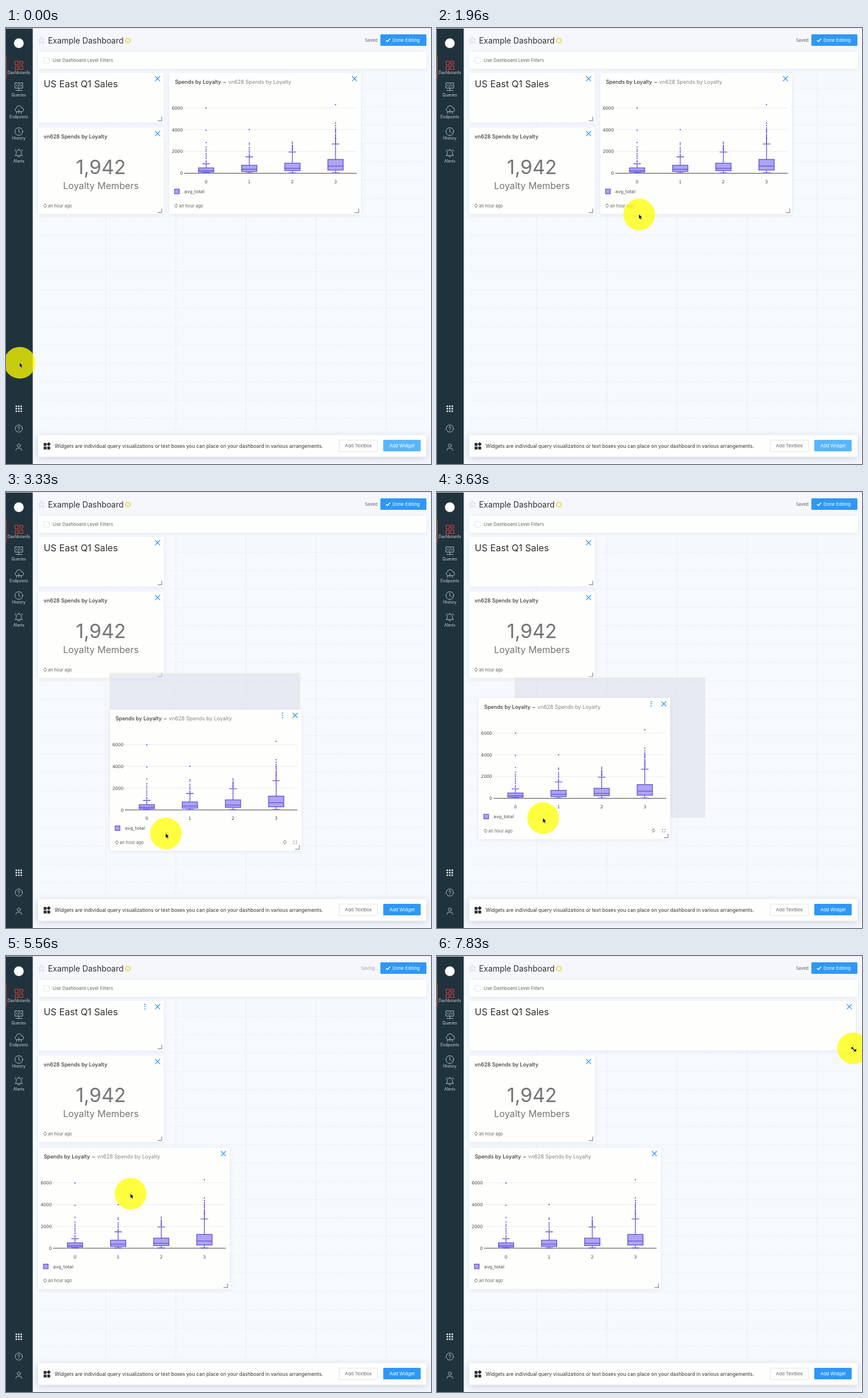
Animation, 739 px wide and 758 px high, one loop 8 s. Source, as an HTML page:

```html
<!DOCTYPE html>
<html lang="en">
<head>
<meta charset="utf-8">
<title>Example Dashboard</title>
<style>
  html, body { margin: 0; width: 100%; height: 100%; overflow: hidden; background: #f6f9fd; }
  svg { display: block; width: 739px; height: 758px; font-family: Inter, Roboto, sans-serif; }
  .card { fill: #fefefd; filter: drop-shadow(0 1px 3px rgba(90, 110, 150, .13)); }
  .bar { fill: #fefefd; filter: drop-shadow(0 3px 7px rgba(70, 100, 130, .25)); }
  .title { font-size: 9.15px; font-weight: 500; fill: #3a3a3a; }
  .title .muted { font-weight: 400; fill: #858585; }
  .ago { font-size: 7.4px; fill: #666; }
  .axis { font: 7.6px "DejaVu Sans", sans-serif; fill: #444; }
  .button { font-size: 7.9px; }
  .nav { font-size: 6.9px; fill: #ccd3d7; text-anchor: middle; }
  .line { fill: none; stroke: #c3cbd0; stroke-width: .9; stroke-linejoin: round; stroke-linecap: round; }
  .tool { fill: none; stroke: #777; stroke-width: .9; }
  .close { fill: none; stroke: #2e96f1; stroke-width: 1.3; }
  .grip { fill: none; stroke: #888; stroke-width: 1.2; }
  .box { fill: #aea4f3; stroke: #6254d9; stroke-width: 1.3; }
</style>
</head>
<body>
<svg viewBox="0 0 739 758">
  <rect width="739" height="758" fill="#f6f9fd"/>
  <rect width="739" height="40" fill="#f6f7fc"/>
  <rect width="739" height="1" fill="#dfe1e4"/>
  <g id="grid" fill="none"></g>

  <!-- header -->
  <path d="M61.5 15.7l1.7 3.9 4.2.4-3.2 2.8 1 4.1-3.7-2.2-3.7 2.2 1-4.1-3.2-2.8 4.2-.4z" fill="none" stroke="#cfd2d6" stroke-width=".9"/>
  <text x="73" y="26.7" font-size="13.9" fill="#303236">Example Dashboard</text>
  <g fill="none" stroke="#e3d943">
    <circle cx="212" cy="22" r="4.4" stroke-width="1.5" stroke-dasharray="2.5 .95"/>
    <circle cx="212" cy="22" r="3.2" stroke-width=".8"/>
  </g>
  <text id="status" y="24.4" font-size="7.5" fill="#666"></text>
  <rect x="651" y="11" width="80" height="20" rx="1.5" fill="#3097f4"/>
  <path d="M661 21.2l2.3 2.4 4.5-4.8" fill="none" stroke="#fff" stroke-width="1.6"/>
  <text x="672" y="24" class="button" fill="#fff">Done Editing</text>
  <rect x="56" y="42" width="675" height="29" class="card"/>
  <rect x="66" y="51.5" width="9.5" height="9.5" rx="1" fill="#fff" stroke="#e5e5e5"/>
  <text x="81" y="59.3" font-size="7.95" fill="#666">Use Dashboard Level Filters</text>

  <!-- widgets -->
  <g id="members" transform="translate(56 173.5)"></g>
  <g id="banner" transform="translate(56 78)"></g>
  <rect id="slot" width="333" height="245.5" fill="#dcdeea" opacity=".55" stroke="#f8f8e6" stroke-width="2"/>
  <g id="chart"></g>

  <!-- footer -->
  <rect x="56" y="707.5" width="675" height="38" class="bar"/>
  <path d="M65.5 721.5h5v5h-5zm0 6.3h5v5h-5zm6.3 0h5v5h-5zM74.3 720l3.5 3.5-3.5 3.5-3.5-3.5z" fill="#26282b"/>
  <text x="84.5" y="730" font-size="8.55" fill="#333">Widgets are individual query visualizations or text boxes you can place on your dashboard in various arrangements.</text>
  <rect x="579.5" y="716.5" width="66.5" height="20" rx="1.5" fill="#fff" stroke="#e1e3e6"/>
  <text x="612.7" y="729.4" class="button" text-anchor="middle" fill="#666">Add Textbox</text>
  <rect id="add" x="656" y="716" width="65" height="20" rx="1.5"/>
  <text x="688.7" y="729.4" class="button" text-anchor="middle" fill="#fff">Add Widget</text>

  <!-- sidebar -->
  <rect y="1" width="46.5" height="757" fill="#20333d"/>
  <rect y="48" width="1" height="41" fill="#c23a32"/>
  <circle cx="22.3" cy="26.5" r="8.5" fill="#fff"/>
  <path class="line" style="stroke:#e04435;stroke-width:1.1" d="M15.7 57.8h5.4v6.4h-5.4zM23.9 57.8h5.4v5h-5.4zM15.7 67.2h5.4v5h-5.4zM23.9 65.8h5.4v6.4h-5.4z"/>
  <path class="line" d="M16 95.5h13v9H16zM22.5 104.5v4M17 108.5h11M20 98l-2 2 2 2M25 98l2 2-2 2M23.3 97.5l-1.6 5"/>
  <path class="line" d="M18.5 145.5a3.5 3.5 0 0 1-.5-6.5 4.6 4.6 0 0 1 9-.5 3.5 3.5 0 0 1 0 7zM22.3 142v5M18.5 145.5v2M26.5 145.5v2"/>
  <path class="line" d="M18 148.5h.1M22.3 148.5h.1M26.7 148.5h.1" stroke-width="2"/>
  <circle class="line" cx="22.3" cy="180" r="6.7"/><path class="line" d="M22.3 175.5v4.8l3 1.8"/>
  <path class="line" d="M16 221.5c1.7-1.2 2-2.7 2-5a4.3 4.3 0 0 1 8.6 0c0 2.3.3 3.8 2 5zM20.5 223.5q1.8 1.7 3.6 0M22.3 210.5v1.5M16 214q.2-2 1.5-3M28.6 214q-.2-2-1.5-3"/>
  <g id="nav"></g>
  <circle class="line" cx="22.3" cy="696.3" r="6.2"/>
  <path class="line" d="M20.5 695a1.8 1.8 0 1 1 2.7 1.5q-.9.5-.9 1.4M22.3 699.5v.2"/>
  <circle class="line" cx="22.3" cy="726" r="2.7"/><path class="line" d="M17.2 734.5v-.8a3.4 3.4 0 0 1 3.4-3h3.4a3.4 3.4 0 0 1 3.4 3v.8"/>

  <!-- pointer -->
  <g id="pointer">
    <circle r="27.5" fill="#ff0" opacity=".75"/>
    <path id="arrow" d="M-.5-.3v8.4l2-1.8 1.5 3 1.4-.7-1.4-2.9h2.7z" fill="#000" stroke="#fff" stroke-width=".5"/>
    <path id="resize" d="M-2-1l4.500 4.500M-2.300 1v-2.300H0M4.700 2.200V4.700H2.200z" fill="#000" stroke="#000" stroke-width="1.2"/>
  </g>
</svg>
<script>
const $ = id => document.getElementById(id);
const series = (count, make) => Array.from({ length: count }, (_, i) => make(i)).join('');
const move = (id, x, y) => $(id).setAttribute('transform', `translate(${x} ${y})`);
const clamp = v => Math.min(1, Math.max(0, v));
const ramp = (t, from, to) => clamp((t - from) / (to - from));
const smooth = p => p * p * (3 - 2 * p);
const mix = (a, b, p) => a + (b - a) * p;

// Static parts
$('grid').innerHTML =
  series(5, i => `<path d="M${173.3 + 122 * i} 78V697" stroke="#d3d8e0" stroke-dasharray="1 2"/>`) +
  series(19, i => `<path d="M56 ${104.7 + 31.9 * i}H731" stroke="#e7ebf1" stroke-dasharray="2 2"/>`);

$('nav').innerHTML =
  [['Dashboards', 79.5], ['Queries', 118.7], ['Endpoints', 156.8], ['History', 193.7], ['Alerts', 233.5]]
    .map(([label, y]) => `<text class="nav" x="22.3" y="${y}">${label}</text>`).join('') +
  series(9, i => `<rect x="${16.6 + i % 3 * 4.3}" y="${656.3 + Math.floor(i / 3) * 4.3}" width="2.7" height="2.7" rx=".6" fill="#e3e7ea"/>`);

const refresh = (x, y) => `<path class="tool" transform="translate(${x} ${y})"
  d="M-2.3 1A2.5 2.5 0 0 1 1.2-2.2M2.3-1A2.500 2.500 0 0 1-1.200 2.200M.2-3.400l1.200 1.200-1.300 1M-.2 3.400l-1.200-1.200 1.300-1"/>`;
const ago = y => refresh(12, y - 2.6) + `<text class="ago" x="17" y="${y}">an hour ago</text>`;
const closeIcon = '<path class="close" d="M-15.3 5.8l8.6 8.6m0-8.6l-8.6 8.6"/>';
const dots = series(3, i => `<circle cx="-33" cy="${6.2 + 3.9 * i}" r="1.1" fill="#2e96f1"/>`);
const grip = '<path class="grip" d="M-3.7-9.7v7h-7"/>';

function card(id, width, height, content) {
  $(id).innerHTML = `<rect id="${id}Body" class="card" width="${width}" height="${height}"/>${content}
    <g id="${id}Top" transform="translate(${width} 0)">${closeIcon}<g id="${id}Dots" opacity="0">${dots}</g></g>
    <g id="${id}Grip" transform="translate(${width} ${height})">${grip}</g>`;
}

// Each box: quartiles, median, upper whisker, then outliers, as heights in the card
const boxes = [
  { top: 165.2, bottom: 172.5, median: 170, whisker: 158, outliers: [61.2, 100, 121, 129, 133, 136, 140, 143, 146, 149, 153, 155] },
  { top: 160.6, bottom: 171.5, median: 167.5, whisker: 146, outliers: [98.7, 122, 124.5, 130, 133, 136, 138.5, 142, 144] },
  { top: 157, bottom: 170, median: 166, whisker: 137.7, outliers: [120.5, 123, 126, 127.5, 129, 131, 132.5, 134, 135.5] },
  { top: 150.5, bottom: 169, median: 162, whisker: 123.7, outliers: [55.3, 87.2, 91.7, 95.5, 98, 100, 102, 104, 107, 109, 111, 113, 114.5, 116, 118, 120, 122] }
];

function boxPlot({ top, bottom, median, whisker, outliers }, i) {
  const x = 64 + 75 * i;
  return `<g class="box"><path d="M${x} ${whisker}V174M${x - 6.5} ${whisker}h13M${x - 6.5} 174h13"/>
    <rect x="${x - 13.3}" y="${top}" width="26.6" height="${bottom - top}"/><path d="M${x - 13.3} ${median}h26.6"/></g>
    ${outliers.map(y => `<circle cx="${x}" cy="${y}" r="1.1" fill="#5d50d6"/>`).join('')}
    <text class="axis" x="${x}" y="192" text-anchor="middle">${i}</text>`;
}

const plot =
  series(4, i => `<path d="M26 ${174.5 - 37.9 * i}h300" stroke="${i ? '#ececee' : '#444'}"/>
    <text class="axis" x="23.5" y="${177.3 - 37.9 * i}" text-anchor="end">${2000 * i}</text>`) +
  boxes.map(boxPlot).join('') +
  '<rect class="box" x="9.2" y="202.2" width="8" height="8"/><text class="axis" x="26" y="209">avg_total</text>';

card('banner', 218.5, 86, '<text x="9.5" y="25" font-size="16.2" fill="#303236">US East Q1 Sales</text>');
card('members', 218.5, 150, `<text class="title" x="9.5" y="18.7">vn628 Spends by Loyalty</text>
  <g text-anchor="middle" fill="#757575"><text x="109" y="80.3" font-size="34">1,942</text>
  <text x="109" y="106" font-size="16.1">Loyalty Members</text></g>${ago(138)}`);
card('chart', 333, 245.5, `<text class="title" x="9.7" y="18.7">Spends by Loyalty <tspan x="94">–</tspan>
  <tspan class="muted" x="102.5">vn628 Spends by Loyalty</tspan></text>${plot}${ago(233.5)}
  <g id="tools" opacity="0">${refresh(304, 230.5)}
  <path class="tool" d="M319.5 230v-1.5h1.5M323 228.5h1.5v1.5M324.5 231.5v1.5h-1.5M321 233h-1.5v-1.5"/></g>`);

// Pointer path: time, x, y and optional velocity in px per ms
const path = [
  [0, 24, 582], [1460, 24, 582], [1960, 351.3, 324.3, .25, -.2], [2260, 397, 287.5],
  [2800, 397, 287.5], [3330, 278.5, 593.5, -.48, .08], [3620, 184.5, 567],
  [4900, 184.5, 567], [5560, 216.5, 414, .15, -.73], [5700, 237, 314, .12, -.65], [6130, 270, 160.5],
  [6510, 270, 160.5], [6530, 274.5, 160.5, .6, 0], [6800, 642, 160.5],
  [7060, 642, 160.5], [7160, 642, 172], [7360, 642, 172], [7830, 723.5, 160.5], [8000, 723.5, 160.5]
];

function pointerAt(t) {
  const i = Math.max(1, path.findIndex(key => key[0] > t));
  const a = path[i - 1], b = path[i], span = b[0] - a[0], p = (t - a[0]) / span, q = 1 - p;
  return [1, 2].map(k => mix(a[k], b[k], smooth(p)) +
    span * p * q * (q * (a[k + 2] || 0) - p * (b[k + 2] || 0)));
}

const home = [284, 78], docked = [56, 333.5], grab = [397, 287.5];

// The dragged card trails the pointer slightly, then eases into its slot
function chartAt(t) {
  const lagged = pointerAt(Math.max(0, Math.min(t, 4400) - 34));
  const held = home.map((v, k) => t < 2800 ? v : v + lagged[k] - grab[k]);
  const snap = smooth(ramp(t, 4400, 4730));
  return held.map((v, k) => mix(v, docked[k], snap));
}

function statusAt(t) {
  if (t < 4400 || t >= 6700) return 'Saved';
  return 'Saving' + '.'.repeat(t < 4700 ? 1 : t < 5200 ? 2 : t < 5800 ? 3 : 1);
}

function draw(t) {
  const [x, y] = pointerAt(t);
  move('pointer', x, y);
  const resizing = t >= 6100;
  $('arrow').style.display = resizing ? 'none' : '';
  $('resize').style.display = resizing ? '' : 'none';

  move('chart', ...chartAt(t));
  const hover = t < 5480 ? ramp(t, 2050, 2400) : 0;
  $('chartDots').setAttribute('opacity', hover);
  $('tools').setAttribute('opacity', hover);

  const first = smooth(ramp(t, 2850, 3350)), second = smooth(ramp(t, 3480, 3850));
  move('slot', mix(mix(284, 179, first), 56, second), mix(mix(78, 315, first), 333.5, second));
  $('slot').style.display = t >= 2800 && t < 4400 ? '' : 'none';

  const stretched = t >= 6510;
  const width = 218.5 + (stretched ? x - 270 : 0), height = 86 + (stretched ? y - 160.5 : 0);
  $('bannerBody').setAttribute('width', width);
  $('bannerBody').setAttribute('height', height);
  move('bannerTop', width, 0);
  move('bannerGrip', width, height);
  $('bannerDots').setAttribute('opacity', t >= 5520 && !stretched ? 1 : 0);

  const status = statusAt(t), saved = status === 'Saved';
  $('status').textContent = status;
  $('status').setAttribute('x', saved ? 624 : 617);
  $('status').setAttribute('opacity', saved ? 1 : .6);

  const lit = ramp(t, 2300, 2500);
  $('add').setAttribute('fill', `rgb(${mix(88, 48, lit)} ${mix(182, 151, lit)} ${mix(253, 244, lit)})`);
}

const start = performance.now();
(function tick() {
  draw((performance.now() - start) % 8000);
  requestAnimationFrame(tick);
})();
</script>
</body>
</html>
```
